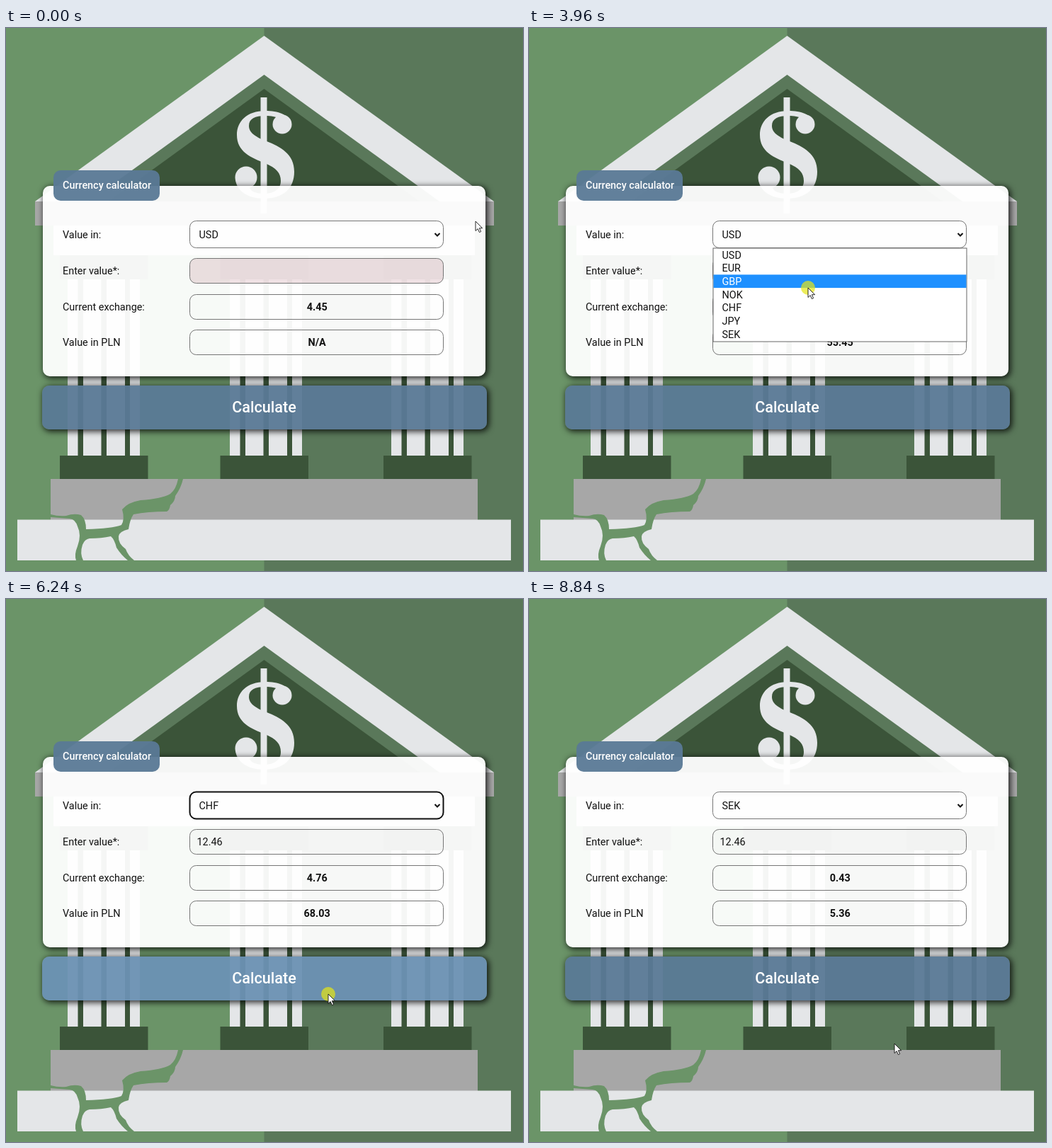
An HTML page that plays this animation: 730 by 767 pixels, repeating every 9200 ms.

```html
<!DOCTYPE html>
<html lang="en">
<head>
<meta charset="utf-8">
<title>Currency calculator</title>
<style>
  html, body { margin: 0; width: 100%; height: 100%; overflow: hidden; }
  body { position: relative; background: #5a785a; }
  svg, div { position: absolute; }
  svg { left: 0; top: 0; }
  div { border-radius: 10px; }
  .panel { left: 52px; top: 222.5px; width: 625px; height: 269px; background: rgba(255,255,255,.95); }
  .blue { background: rgba(90,122,150,.95); }
  .tag { left: 67px; top: 201px; width: 150px; height: 43px; }
  .button { left: 51px; top: 505px; width: 628px; height: 62px; }
  .panel, .button { box-shadow: 2px 2px 9px 1px rgba(0,0,0,.8); }
  text { font: 14.4px Roboto, sans-serif; fill: #111; }
  .light { fill: #e4e6e8; }
  .grey { fill: #a7a7a7; }
  .dark { fill: #3b5439; }
  .white { fill: #fff; font-weight: 500; }
  .result { font-weight: 600; text-anchor: middle; }
  .field { fill: none; stroke: #767676; }
  .field.focus { stroke: #101010; stroke-width: 2; }
</style>
</head>
<body>
<svg width="730" height="767">
  <path fill="#6b9468" d="M0 0H364.5V767H0Z"/>
  <path class="light" d="M364.5 11L689 245H41Z"/>
  <path fill="#5a785a" d="M364.5 66L612 245H117Z"/>
  <path class="dark" d="M364.5 86L584 245H145Z"/>
  <path class="grey" d="M41 245H689V279H41Z"/>
  <path class="light" d="M67 279H662V321H67Z"/>
  <g class="light">
    <path d="M359.500 98H368.500V262H359.500Z"/>
    <path d="M403 136C400 122 384 117 366 117C340 117 326 132 326 151C326 175 346 183 366 191C382 198 388 205 388 216C388 228 378 234 364 234C354 234 346 231 345 227L324 212C324 230 342 241 364 241C392 241 407 226 407 203C407 178 388 168 368 160C350 153 343 147 343 138C343 128 352 124 366 124C374 124 382 125 384 128Z"/>
    <circle cx="390" cy="136" r="13.500"/>
    <circle cx="339" cy="211" r="15.500"/>
  </g>
  <g id="columns"></g>
  <path class="grey" d="M63 637H666V695H63Z"/>
  <path class="light" d="M16 694.500H713V752H16Z"/>
  <path fill="#6b9468" d="M243 637Q240 652 232 658Q220 665 190 667Q172 670 164 680Q168 694 163 702Q150 707 113 708Q113 694 106 688Q96 685 85 689Q74 690 63 687V691Q75 692 90 693Q98 694 101 704Q107 716 101 732Q96 744 99 752H109Q104 742 108 730Q111 722 118 721Q135 721 148 718Q153 722 156 734Q163 745 172 752H181Q172 745 169 736Q158 728 159 718Q160 711 173 708Q175 694 180 687Q200 683 227 683Q231 681 232 674Q239 668 239 661Q247 650 250 637Z"/>
</svg>
<div class="panel"></div>
<div class="blue tag"></div>
<div class="blue button" id="button"></div>
<svg width="730" height="767">
  <text class="white" x="80" y="227">Currency calculator</text>
  <text class="white" x="364.500" y="543" text-anchor="middle" style="font-size:21.6px">Calculate</text>
  <text x="80" y="297">Value in:</text>
  <text x="80" y="348">Enter value*:</text>
  <text x="80" y="399">Current exchange:</text>
  <text x="80" y="449">Value in PLN</text>

  <rect id="select" class="field" x="259.500" y="272.500" width="358" height="38" rx="9" style="fill:rgba(255,255,255,.5)"/>
  <rect id="input" class="field" x="259.500" y="325.500" width="358" height="35" rx="9"/>
  <rect class="field" x="259.500" y="376.500" width="358" height="35" rx="9"/>
  <rect class="field" x="259.500" y="426.500" width="358" height="35" rx="9"/>
  <path d="M605.500 290L609 293.500L612.500 290" fill="none" stroke="#111" stroke-width="2"/>
  <text id="currency" x="272.500" y="297"></text>
  <text id="amount" x="269.500" y="348"></text>
  <path id="caret" d="M0 335V351" stroke="#111"/>
  <g id="spinner">
    <path fill="#e9e9e9" d="M596 334H608V352H596Z"/>
    <path fill="#444" d="M598 341L602 336.500L606 341ZM598 344.500L602 349L606 344.500Z"/>
  </g>
  <text id="rate" class="result" x="439.200" y="399"></text>
  <text id="total" class="result" x="439.200" y="449"></text>

  <g id="list">
    <rect x="260" y="311" width="358" height="132" fill="#fff" stroke="#666"/>
    <rect id="highlight" x="260.500" width="357" height="18.700" fill="#1e90ff"/>
  </g>
  <circle id="click" r="10" fill="#e6e614" opacity=".7"/>
  <path id="arrow" d="M0 0V13.500L3.200 10.600L5.400 15.600L7.600 14.600L5.400 9.700H9.600Z" fill="#fff" stroke="#111" stroke-width=".9"/>
  <path id="beam" d="M-3.500 -6.500H-1L0 -5.500L1 -6.500H3.500M0 -5.500V5.500M-3.500 6.500H-1L0 5.500L1 6.500H3.500" fill="none" stroke="#222"/>
</svg>
<script>
const LOOP = 9200, STEP = 40, ROW = 18.7, LIST_TOP = 311;
const currencies = ['USD', 'EUR', 'GBP', 'NOK', 'CHF', 'JPY', 'SEK'];
const $ = id => document.getElementById(id);
const show = (id, on) => { $(id).style.display = on ? '' : 'none'; };
const within = (t, spans) => spans.some(([a, b]) => t >= a && t < b);
const latest = (t, events) => events.filter(e => e[0] <= t).pop();

// Timelines: [time, value...] or [from, to]
const pointer = [
  [0, 663, 273], [240, 663, 273], [560, 492, 342], [2280, 492, 342], [2640, 470, 558],
  [3000, 470, 558], [3240, 424, 327], [3400, 400, 292], [3600, 400, 292], [3800, 394, 367],
  [4000, 394, 367], [4320, 460, 556], [4920, 460, 556], [5240, 372, 292], [5440, 372, 292],
  [5520, 371, 312], [5720, 380, 396], [5880, 380, 396], [6080, 455, 558], [6640, 455, 558],
  [6960, 376, 292], [7080, 376, 292], [7160, 372, 326], [7400, 385, 433], [7600, 385, 433],
  [7840, 470, 560], [8520, 470, 560], [8840, 516, 628], [LOOP, 516, 628]
];
const typing = [[0, ''], [1080, '1'], [1120, '12'], [1320, '12.'], [1600, '12.4'], [1720, '12.46']];
const choices = [[0, 'USD', '4.45'], [4000, 'GBP', '5.46'], [5840, 'CHF', '4.76'], [7520, 'SEK', '0.43']];
const totals = [[0, 'N/A'], [2720, '55.45'], [4600, '68.03'], [6320, '59.31'], [8000, '5.36']];
const opened = [[3480, 4000], [5360, 5840], [7080, 7520]];
const selectFocus = [[4000, 4600], [5840, 6320], [7520, 8000]];
const inputFocus = [[600, 2720]];
const caretOn = [[600, 920], [1080, 2040], [2360, 2720]];
const presses = [[2680, 2760], [4560, 4640], [6240, 6360], [7960, 8040]];
const clicks = [...presses, [600, 640], [3400, 3480], [3960, 4000],
  [5280, 5360], [5800, 5880], [7000, 7080], [7480, 7560]];

const bar = (x, y, w, h, type) => `<rect class="${type}" x="${x}" y="${y}" width="${w}" height="${h}"/>`;
$('columns').innerHTML = [[76, 87], [302.5, 316], [533, 544]].map(([base, shaft]) =>
  bar(base, 321, 124.5, 34, 'dark') + bar(shaft, 355, 102, 250, 'dark') +
  [[0, 14.5], [22, 25.5], [55, 26], [88, 14]].map(([x, w]) => bar(shaft + x, 355, w, 250, 'light')).join('') +
  bar(base, 604, 124.5, 33, 'dark')).join('');
$('list').insertAdjacentHTML('beforeend', currencies.map((name, i) =>
  `<text x="272.500" y="${325.5 + i * ROW}">${name}</text>`).join(''));
const options = $('list').querySelectorAll('text');

function pointerAt(t) {
  const i = pointer.findIndex(p => p[0] > t);
  const [t0, x0, y0] = pointer[i - 1], [t1, x1, y1] = pointer[i];
  const u = (t - t0) / (t1 - t0), k = u * u * (3 - 2 * u);
  return [x0 + (x1 - x0) * k, y0 + (y1 - y0) * k];
}

function render(t) {
  const [x, y] = pointerAt(t);
  const inside = (top, bottom) => x > 259 && x < 618 && y > top && y < bottom;
  const open = within(t, opened), focused = within(t, inputFocus);
  const overInput = !open && inside(325, 361);
  const amount = latest(t, typing)[1];
  const [, currency, rate] = latest(t, choices);

  $('currency').textContent = currency;
  $('rate').textContent = rate;
  $('total').textContent = latest(t, totals)[1];
  $('amount').textContent = amount;

  const invalid = !amount || amount.endsWith('.');
  $('input').style.fill = invalid ? 'rgba(130,20,40,.12)' : 'rgba(0,0,0,.012)';
  $('input').classList.toggle('focus', focused);
  $('select').classList.toggle('focus', within(t, selectFocus));
  show('spinner', focused || overInput);
  show('caret', within(t, caretOn));
  const caretX = 269.5 + [...amount].reduce((w, c) => w + (c === '.' ? 3.8 : 8.09), 0);
  $('caret').setAttribute('transform', `translate(${Math.floor(caretX) + .5})`);

  show('list', open);
  const row = y > 313 ? Math.min(6, Math.floor((y - LIST_TOP) / ROW)) : currencies.indexOf(currency);
  $('highlight').setAttribute('y', LIST_TOP + row * ROW);
  options.forEach((o, i) => { o.style.fill = i === row ? '#fff' : '#111'; });

  const hover = y > 505 && y < 567;
  $('button').style.filter = within(t, presses) ? 'brightness(1.2)' : hover ? 'brightness(1.1)' : '';

  show('arrow', !overInput);
  show('beam', overInput);
  show('click', within(t, clicks));
  for (const id of ['arrow', 'beam', 'click']) $(id).setAttribute('transform', `translate(${x} ${y})`);
}

const start = performance.now();
function tick() {
  const t = (performance.now() - start) % LOOP;
  render(Math.floor(t / STEP) * STEP);
  requestAnimationFrame(tick);
}
tick();
</script>
</body>
</html>
```
